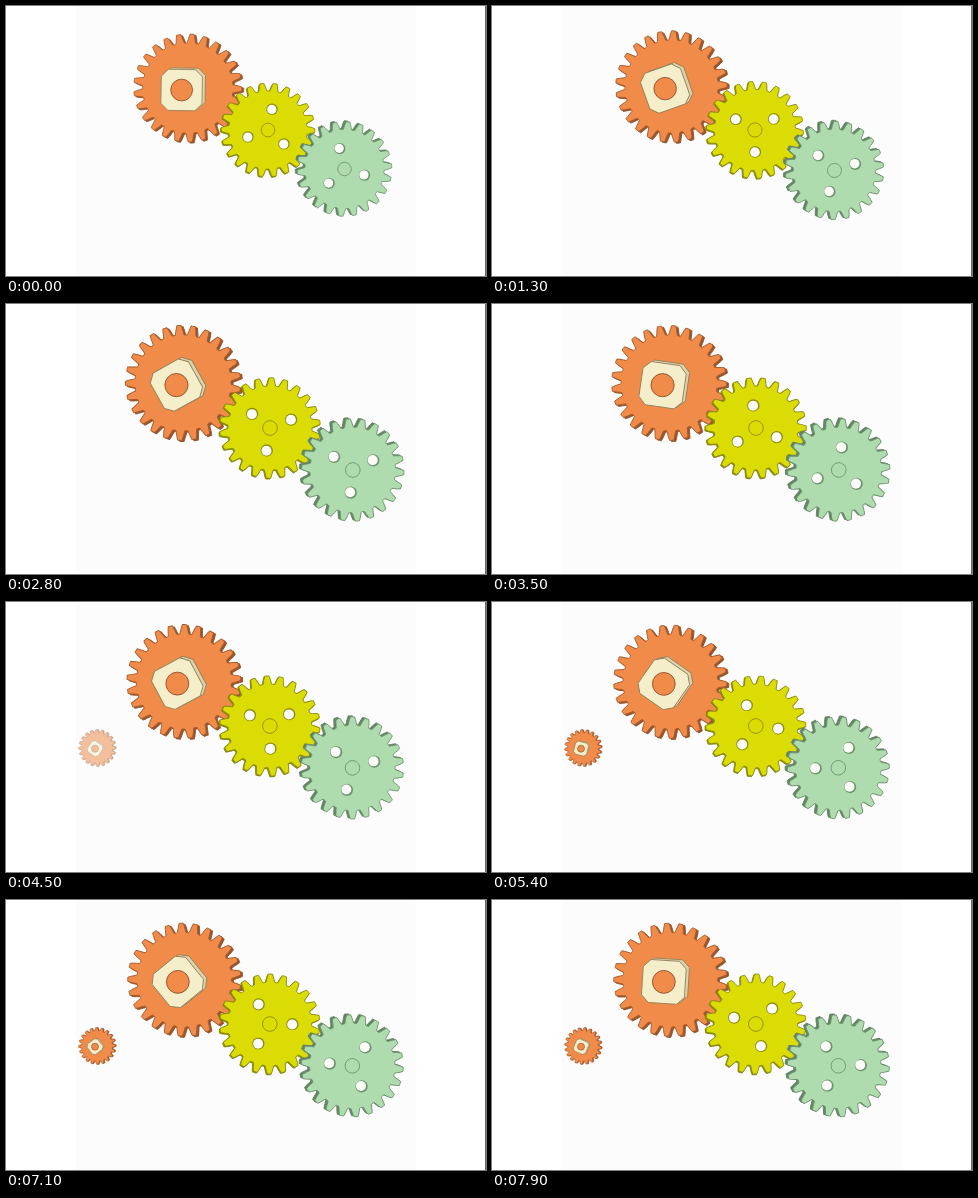
These frames come from a looping animation (480 by 270 pixels, 8 s). An HTML page:

```html
<!DOCTYPE html>
<html lang="en">
<head>
<meta charset="utf-8">
<title>Gear train</title>
<style>
html, body { margin: 0; width: 100%; height: 100%; overflow: hidden; background: #fff; }
svg { display: block; width: 100vw; height: 100vh; }
</style>
</head>
<body>
<svg id="stage" viewBox="0 0 480 270">
  <rect width="480" height="270" fill="#fff"/>
  <rect x="70" width="339.5" height="270" fill="#fcfcfc"/>
  <rect x="479" width="1" height="270" fill="#666"/>
</svg>
<script>
const LOOP = 8, STEP = 0.1; // seconds
const stage = document.getElementById('stage');
const rad = d => d * Math.PI / 180;
const clamp = v => Math.max(0, Math.min(1, v));
const ramp = (t, a, b) => clamp((t - a) / (b - a));
const ease = (t, a, b) => { const k = ramp(t, a, b); return k * k * (3 - 2 * k); };

function add(parent, tag, attrs) {
  const el = document.createElementNS('http://www.w3.org/2000/svg', tag);
  for (const k in attrs) el.setAttribute(k, attrs[k]);
  return parent.appendChild(el);
}

const move = (el, x, y, turn = 0) => el.setAttribute('transform', `translate(${x} ${y}) rotate(${turn})`);

// Rounded teeth: the radius swings between root and tip with flattened ends.
function toothPath(r, n, depth) {
  const steps = n * 14, pts = [];
  for (let i = 0; i < steps; i++) {
    const a = 2 * Math.PI * i / steps;
    const k = clamp(.53 + .78 * Math.cos(n * a));
    const rr = r - depth * (1 - k);
    pts.push((rr * Math.cos(a)).toFixed(2) + ' ' + (rr * Math.sin(a)).toFixed(2));
  }
  return 'M' + pts.join('L') + 'Z';
}

function hubPath(h) {
  const k = h * .66;
  return `M${-k} ${-h}H${k}L${h} ${-k}V${k}L${k} ${h}H${-k}L${-h} ${k}V${-k}Z`;
}

function makeGear(o) {
  const g = add(stage, 'g', { 'stroke-linejoin': 'round' });
  const d = toothPath(o.r, o.teeth, o.r * .165);
  const line = { 'stroke-width': o.r < 30 ? .6 : .9 };
  const gear = { ...o, g, holes: [] };
  gear.back = add(g, 'path', { d, fill: o.side, stroke: o.side, ...line });
  gear.front = add(g, 'path', { d, fill: o.fill, stroke: o.edge, ...line });
  if (o.hub) {
    const style = { d: hubPath(o.hub), stroke: '#94805a', ...line };
    gear.hubBack = add(g, 'path', { ...style, fill: '#ddd3ab' });
    gear.hubFront = add(g, 'path', { ...style, fill: '#f4eecb' });
    gear.bore = add(g, 'circle', { r: o.hub * .53, fill: o.fill, stroke: '#8e5030', ...line });
  } else {
    for (let i = 0; i < 3; i++) {
      gear.holes.push([
        add(g, 'circle', { r: 6.1, fill: o.edge }),
        add(g, 'circle', { r: 5, fill: '#fbfbf8' })
      ]);
    }
    add(g, 'circle', { r: 7.3, fill: 'none', stroke: o.edge, ...line });
  }
  return gear;
}

function pose(gear, { x, y, r }, ring, turn) {
  const [dx, dy] = gear.shift;
  gear.g.setAttribute('transform', `translate(${x} ${y}) scale(${r / gear.r})`);
  move(gear.back, dx, dy, ring);
  move(gear.front, 0, 0, ring);
  if (gear.hub) {
    const hx = -.3 * gear.hub, hy = .1 * gear.hub;
    move(gear.hubBack, hx + .15 * gear.hub, hy - .07 * gear.hub, turn);
    move(gear.hubFront, hx, hy, turn);
    move(gear.bore, hx, hy);
  }
  gear.holes.forEach((pair, i) => {
    const a = rad(turn + i * 120), hx = 22.6 * Math.cos(a), hy = 22.6 * Math.sin(a);
    pair.forEach((c, n) => move(c, hx + n * dx * .3, hy + n * dy * .3));
  });
}

// The view closes in, then backs off a little.
function place(t, { from, to, settle }) {
  const k = ramp(t, 0, 2.7) - settle * ease(t, 3, 5.5);
  const [x, y, r] = from.map((v, i) => v + (to[i] - v) * k);
  return { x, y, r };
}

// Steady rotation with two short surges.
const spin = (t, start, rate, first, second) =>
  start + rate * t + first * ease(t, 2.2, 3.5) + second * ease(t, 4.5, 6.3);

// Ring angle that puts a tooth of b into a gap of a.
function mesh(a, angleA, posA, b, posB) {
  const dir = Math.atan2(posB.y - posA.y, posB.x - posA.x) * 180 / Math.PI;
  return dir + 180 + (180 - a.teeth * (angleA - dir)) / b.teeth;
}

const orangeLook = { fill: '#f08b49', edge: '#a65c2d', side: '#96552e' };
const small = makeGear({ ...orangeLook, r: 18.3, teeth: 20, shift: [.9, 0], hub: 6.6 });
const orange = makeGear({
  ...orangeLook, r: 56.5, teeth: 25, shift: [2, 1.2], hub: 21.5,
  from: [181.8, 82, 54], to: [177, 78.9, 57.5], settle: .27
});
const yellow = makeGear({
  fill: '#dcdc05', edge: '#8c8c12', side: '#85850f', r: 50, teeth: 22, shift: [-.8, .8],
  from: [262, 124, 46.8], to: [264, 124, 50.3], settle: .08
});
const green = makeGear({
  fill: '#afdcaf', edge: '#6f936f', side: '#638463', r: 51, teeth: 22, shift: [-2.2, -1],
  from: [338.5, 163, 47.3], to: [346.8, 166, 51.2], settle: .06
});

function draw(t) {
  const po = place(t, orange), py = place(t, yellow), pg = place(t, green);
  const turn = spin(t, 1, 53.5, 0, 30);
  const ringY = mesh(orange, turn, po, yellow, py);
  const ringG = mesh(yellow, ringY, py, green, pg);
  pose(orange, po, turn, turn);
  pose(yellow, py, ringY, spin(t, 41, -55, -65, -65));
  pose(green, pg, ringG, spin(t, 17, 66, 30, 30));
  const smallTurn = 35 + 76 * (t - 4.5);
  pose(small, { x: 91, y: 146, r: 18.3 }, smallTurn, smallTurn);
  small.g.setAttribute('opacity', ramp(t, 3.6, 5.3));
}

const start = performance.now();
function tick() {
  const t = (performance.now() - start) / 1000 % LOOP;
  draw(Math.floor(t / STEP) * STEP);
  requestAnimationFrame(tick);
}
tick();
</script>
</body>
</html>
```
